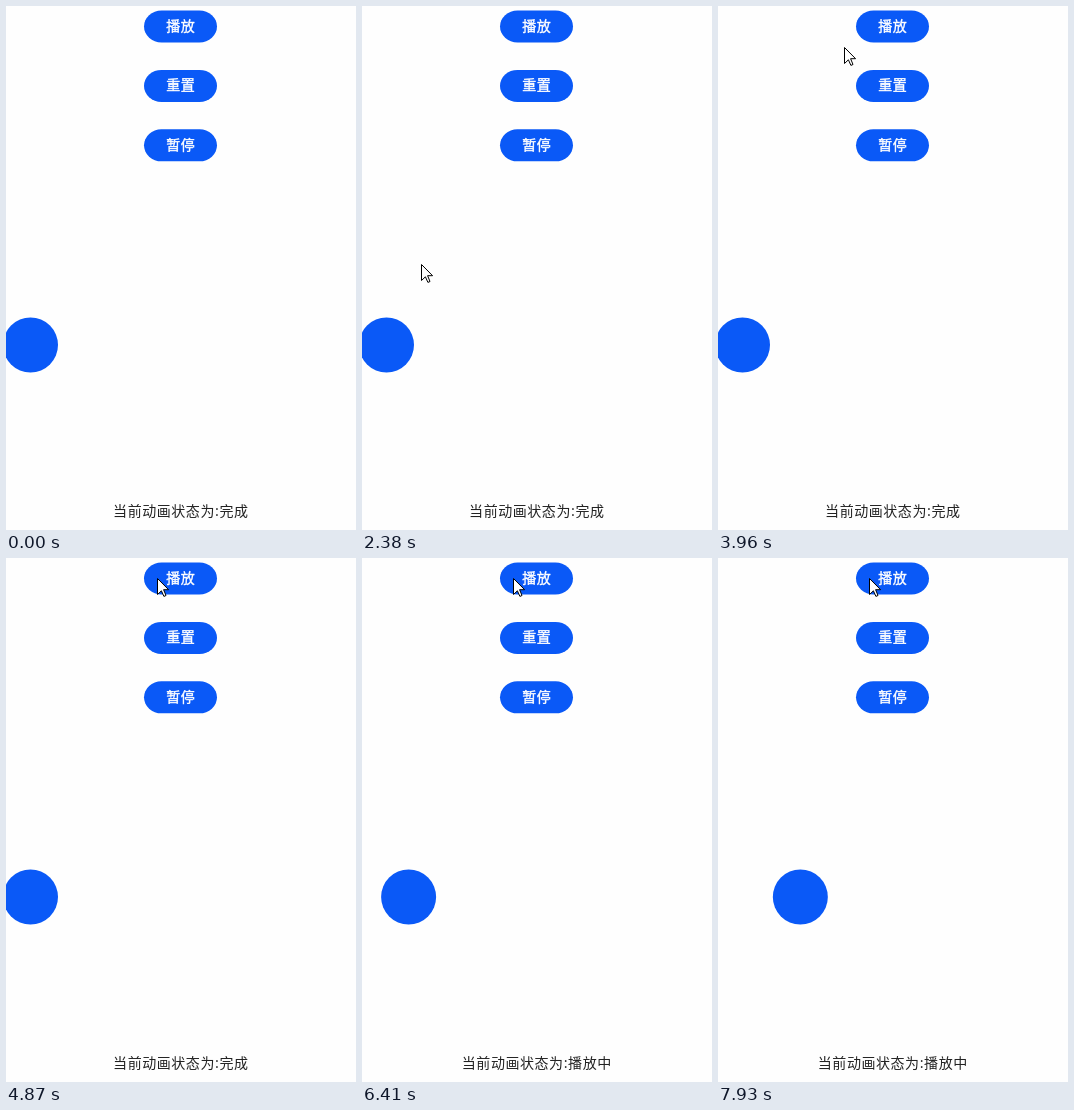
An HTML page that plays this animation: 350 px wide and 524 px high, repeating every 8 s.

```html
<!DOCTYPE html>
<html lang="zh-CN">
<head>
<meta charset="utf-8">
<style>
  html, body { margin: 0; width: 100%; height: 100%; overflow: hidden; background: #fefefe; }
  svg { display: block; width: 100%; height: 100%; }
  text {
    font: 14px "Noto Sans CJK SC", "Noto Sans CJK", sans-serif;
    letter-spacing: .55px;
    text-anchor: middle;
  }
  #buttons text { font-weight: 500; fill: #fff; stroke: #fff; stroke-width: .4; }
</style>
</head>
<body>
<svg viewBox="0 0 350 524">
  <rect width="350" height="524" fill="#fefefe"/>
  <g id="buttons"></g>
  <circle id="ball" cy="339" r="27.5" fill="#0a59f7"/>
  <text id="status" x="174.8" y="510.4" fill="#222"></text>
  <path id="cursor" d="M.5 .5V16.5L4.4 12.8 6.9 18.4 9 17.5 6.6 11.7H11.6Z" fill="#fff" stroke="#000"/>
</svg>
<script>
const LOOP = 8000, ENTER = 300, PLAY = 5030;
const $ = id => document.getElementById(id);

$('buttons').innerHTML = ['播放', '重置', '暂停'].map((label, i) => {
  const y = 4.45 + i * 59.45;
  return `<rect x="138" y="${y}" width="73" height="32" rx="17.5" ry="16" fill="#0a59f7"/>
    <text x="174.8" y="${y + 20.5}">${label}</text>`;
}).join('');

// Turning points of the pointer
const path = [
  { t: ENTER, x: 69, y: 509 },
  { t: 1090, x: 8, y: 380 },
  { t: 1290, x: 8, y: 365 },
  { t: 2380, x: 59, y: 258 },
  { t: 3960, x: 126, y: 41 },
  { t: 4640, x: 151, y: 20 }
];

function pointerAt(t) {
  const i = path.findIndex(k => k.t > t);
  if (i < 0) return path[path.length - 1];
  const b = path[i], a = path[i - 1] || b;
  const p = a === b ? 0 : (t - a.t) / (b.t - a.t);
  return { x: a.x + (b.x - a.x) * p, y: a.y + (b.y - a.y) * p };
}

// Constant acceleration up to cruising speed
function ballAt(t) {
  const speed = 0.0235, ramp = 880;
  const u = Math.max(0, t - PLAY);
  return 24.5 + speed * (u < ramp ? u * u / (2 * ramp) : u - ramp / 2);
}

function draw(t) {
  const { x, y } = pointerAt(t);
  $('cursor').setAttribute('transform', `translate(${Math.round(x)} ${Math.round(y)})`);
  $('cursor').setAttribute('visibility', t < ENTER ? 'hidden' : 'visible');
  $('ball').setAttribute('cx', ballAt(t));
  $('status').textContent = '当前动画状态为:' + (t < PLAY ? '完成' : '播放中');
}

const origin = performance.now();
function tick() {
  draw((performance.now() - origin) % LOOP);
  requestAnimationFrame(tick);
}
tick();
</script>
</body>
</html>
```
